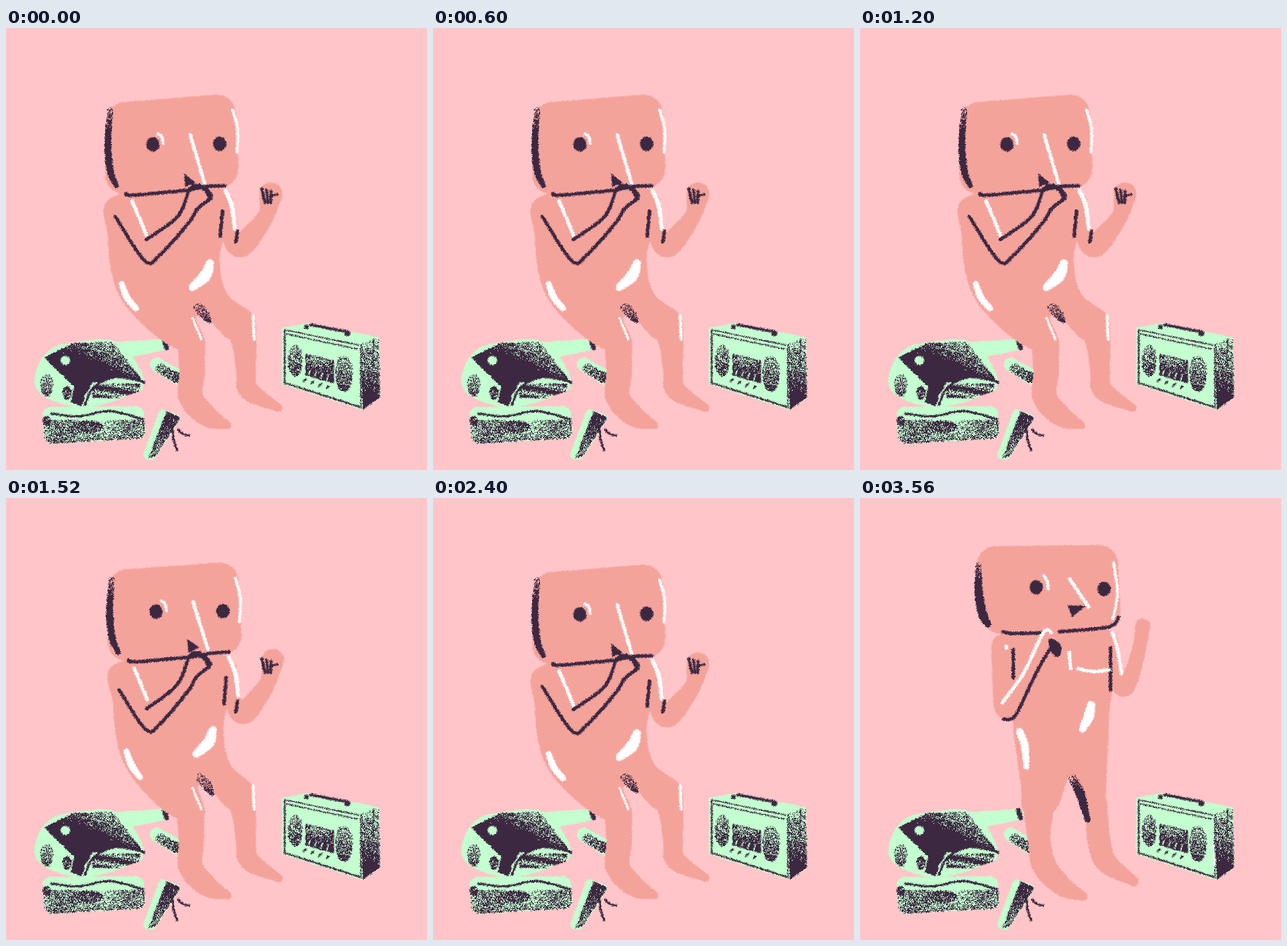
These frames come from a looping animation (731x767 px, 3600 ms). An HTML page with a canvas:

```html
<!DOCTYPE html>
<html lang="en">
<head>
<meta charset="utf-8">
<title>Dancing box head</title>
<style>
html, body { margin: 0; width: 100%; height: 100%; overflow: hidden; background: #ffc5c8; }
canvas { display: block; }
</style>
</head>
<body>
<canvas id="stage" width="731" height="767"></canvas>
<script>
const W = 731, H = 767, STEP = 40, STEPS = 15;
const PINK = '#ffc5c8', SKIN = '#f4a39b', INK = '#3d2841', MINT = '#c3ffcf', WHITE = '#ffffff';
const view = document.getElementById('stage').getContext('2d');

function makeLayer() {
  const layer = document.createElement('canvas');
  layer.width = W;
  layer.height = H;
  return layer.getContext('2d', { willReadFrequently: true });
}

// Stable grain: the same place always gets the same value in 0..1.
function grain(x, y) {
  let h = Math.imul(x, 374761393) + Math.imul(y, 668265263);
  h = Math.imul(h ^ (h >>> 13), 1274126177);
  return ((h ^ (h >>> 16)) >>> 0) / 4294967296;
}

// Catmull-Rom samples through points of any dimension.
function spline(points, closed = false, cuts = 14) {
  const n = points.length, samples = [];
  const at = i => points[closed ? (i + n) % n : Math.max(0, Math.min(n - 1, i))];
  for (let i = 0; i < (closed ? n : n - 1); i++) {
    for (let k = 0; k <= cuts; k++) {
      const t = k / cuts;
      samples.push(at(i).map((b, d) => {
        const a = at(i - 1)[d], c = at(i + 1)[d], e = at(i + 2)[d];
        return b + t / 2 * (c - a + t * (2 * a - 5 * b + 4 * c - e + t * (3 * b - a - 3 * c + e)));
      }));
    }
  }
  return samples;
}

function polygon(points, closed = true) {
  const path = new Path2D();
  for (const [x, y] of points) path.lineTo(x, y);
  if (closed) path.closePath();
  return path;
}

const blob = points => polygon(spline(points, true));

// Tapered limb: joints are [x, y, radius].
function limb(...joints) {
  const path = new Path2D();
  for (const [x, y, r] of spline(joints)) {
    path.moveTo(x + r, y);
    path.arc(x, y, r, 0, 2 * Math.PI);
  }
  return path;
}

function roundQuad(corners, radius) {
  const path = new Path2D(), [a, , , d] = corners;
  path.moveTo((a[0] + d[0]) / 2, (a[1] + d[1]) / 2);
  corners.forEach((c, i) => path.arcTo(...c, ...corners[(i + 1) % 4], radius));
  path.closePath();
  return path;
}

function ellipse(x, y, rx, ry = rx) {
  const path = new Path2D();
  path.ellipse(x, y, rx, ry, 0, 0, 2 * Math.PI);
  return path;
}

function fill(g, path, color) {
  g.fillStyle = color;
  g.fill(path);
}

function line(g, points, color, width) {
  g.strokeStyle = color;
  g.lineWidth = width;
  g.lineCap = g.lineJoin = 'round';
  g.stroke(polygon(spline(points), false));
}

// Spray ink pixels inside a path; density gets box-relative coordinates.
function spray(g, path, [x0, y0, x1, y1], density) {
  g.fillStyle = INK;
  for (let y = Math.floor(y0); y < y1; y++) {
    for (let x = Math.floor(x0); x < x1; x++) {
      const d = density((x - x0) / (x1 - x0), (y - y0) / (y1 - y0));
      if (grain(x, y) < d && g.isPointInPath(path, x + .5, y + .5)) g.fillRect(x, y, 1, 1);
    }
  }
}

function sprayEllipse(g, x, y, rx, ry, density) {
  spray(g, ellipse(x, y, rx, ry), [x - rx, y - ry, x + rx, y + ry], density);
}

function drawBags(g) {
  fill(g, limb([195, 560, 15], [274, 549, 10]), MINT);
  fill(g, blob([[50, 604], [72, 562], [115, 546], [195, 546], [239, 612], [200, 642], [130, 658], [64, 638]]), MINT);
  const flap = polygon([[66, 572], [118, 546], [185, 545], [242, 618], [150, 615], [130, 657], [113, 649], [118, 622]]);
  spray(g, flap, [66, 545, 242, 657], (x, y) => .75 + y * 1.5 - Math.max(0, x - .3) * 1.1);
  sprayEllipse(g, 71, 620, 11, 20, (x, y) => .3 + y * .6);
  sprayEllipse(g, 106, 633, 8, 12, () => .8);
  const pocket = limb([150, 642, 14], [185, 626, 19], [228, 621, 10]);
  fill(g, pocket, MINT);
  spray(g, pocket, [150, 617, 233, 642], (x, y) => .7 + .4 * Math.sin(y * 9 - x * 5));
  line(g, [[137, 654], [152, 624], [190, 606], [239, 614]], INK, 4);
  fill(g, ellipse(103, 577, 8), MINT);
  fill(g, limb([275, 542, 4], [279, 555, 4]), INK);

  const roll = roundQuad([[62, 658], [238, 656], [243, 712], [68, 722]], 14);
  fill(g, roll, MINT);
  spray(g, roll, [66, 680, 242, 722], (x, y) => .32 + .3 * Math.sin(x * 9) * (1 - y) + y * .3);
  sprayEllipse(g, 71, 682, 7, 9, () => .9);
  sprayEllipse(g, 140, 692, 30, 11, () => .8);
  line(g, [[78, 669], [125, 674], [180, 665], [238, 679]], INK, 4);

  fill(g, limb([262, 584, 12], [302, 608, 13]), MINT);
  spray(g, limb([268, 591, 8], [302, 611, 10]), [260, 583, 302, 616], x => .4 + x * .5);

  fill(g, roundQuad([[268, 660], [306, 674], [256, 750], [236, 746]], 6), MINT);
  spray(g, polygon([[279, 665], [303, 676], [260, 743], [247, 746]]), [247, 665, 303, 746], (x, y) => 1 - y * .4);
  line(g, [[289, 695], [291, 714], [297, 733]], INK, 4);
  line(g, [[299, 697], [306, 704], [318, 707]], INK, 4);
}

function drawRadio(g) {
  // Place on the slanted front, u across and v down.
  const front = (u, v) => [484 + 132 * u, 524 + 27 * u + v * (92 + 15 * u)];
  const panel = (u0, v0, u1, v1) => polygon([front(u0, v0), front(u1, v0), front(u1, v1), front(u0, v1)]);

  fill(g, polygon([[479, 520], [525, 512], [648, 537], [649, 641], [620, 663], [479, 618]]), MINT);
  spray(g, polygon([[616, 548], [648, 537], [649, 641], [619, 663]]), [616, 537, 649, 663],
    (x, y) => .3 + y - x * .15);
  line(g, [[638, 542], [638, 590]], INK, 2);
  line(g, [front(0, 0), front(0, 1)], INK, 3);
  line(g, [front(0, 1), front(1, 1)], INK, 3);
  line(g, [front(1, 0), front(1, 1)], INK, 2);
  line(g, [front(0, 0), front(.97, 0)], INK, 2);
  line(g, [front(.03, .07), front(.95, .07)], INK, 2);
  line(g, [[529, 515], [592, 527]], INK, 5);
  fill(g, ellipse(522, 519, 4), INK);
  fill(g, ellipse(593, 530, 5), INK);

  for (const [u, rx] of [[.14, 13], [.78, 15]]) {
    sprayEllipse(g, ...front(u, .52), rx, rx * 2.15, (x, y) => .3 + y * .65);
  }
  const deck = panel(.28, .36, .64, .73);
  spray(g, deck, [...front(.28, .36), ...front(.64, .73)], (x, y) => .4 + y * .8);
  g.lineWidth = 2;
  g.stroke(deck);
  for (let i = 0; i < 4; i++) {
    line(g, [front(.31 + i * .08, .72), front(.34 + i * .08, .62)], MINT, 2);
    line(g, [front(.25 + i * .1, .86), front(.28 + i * .1, .81)], INK, 3);
  }
}

// Every moving part is given as a crouched and an upright pose.
function drawDancer(g, lift) {
  const upright = lift > .5;
  const pose = (low, high) => low.map((p, i) => p.map((v, d) => v + (high[i][d] - v) * lift));
  const skin = path => fill(g, path, SKIN);
  const stroke = (color, width, low, high) => line(g, pose(low, high), color, width);
  const dab = (color, low, high) => fill(g, limb(...pose(low, high)), color);
  const shade = (low, high, density) => {
    const joints = pose(low, high), [a] = joints, b = joints[joints.length - 1];
    spray(g, limb(...joints), [a[0] - 16, a[1] - a[2], b[0] + 10, b[1] + b[2]], density);
  };

  skin(roundQuad(pose([[175, 131], [397, 113], [405, 275], [172, 291]],
    [[199, 84], [446, 81], [454, 225], [215, 237]]), 33));
  skin(blob(pose(
    [[188, 292], [378, 281], [371, 400], [384, 461], [427, 496], [430, 530], [388, 540], [357, 512], [330, 502],
      [345, 550], [298, 557], [240, 517], [192, 455], [177, 365]],
    [[240, 238], [436, 231], [433, 370], [429, 460], [427, 515], [428, 540], [388, 535], [369, 490], [361, 487],
      [336, 545], [286, 545], [279, 495], [267, 410], [261, 320]])));
  dab(SKIN, [[322, 548, 24], [323, 600, 22], [321, 641, 21], [350, 674, 18], [384, 689, 7]],
    [[310, 548, 25], [311, 592, 20], [320, 638, 21], [352, 674, 17], [387, 691, 8]]);
  dab(SKIN, [[410, 522, 24], [415, 560, 20], [417, 600, 17], [423, 630, 17], [473, 659, 7]],
    [[406, 520, 21], [411, 555, 20], [416, 600, 20], [429, 634, 18], [475, 665, 9]]);
  dab(SKIN, [[385, 300, 10], [386, 350, 13], [405, 378, 20], [430, 355, 18], [452, 324, 14], [460, 288, 20]],
    [[438, 245, 6], [444, 310, 10], [458, 329, 16], [473, 302, 14], [485, 260, 12], [491, 222, 13]]);
  dab(SKIN, [[198, 311, 21], [212, 350, 18], [243, 387, 17], [290, 352, 20], [339, 291, 15]],
    [[249, 258, 21], [249, 320, 19], [253, 367, 17], [280, 330, 14], [322, 246, 10]]);

  shade([[181, 143, 5], [177, 200, 6], [181, 248, 6], [192, 274, 4]],
    [[206, 117, 5], [206, 160, 7], [212, 198, 8], [222, 219, 6]], (x, y) => .45 + y * 1.9);
  shade([[334, 485, 8], [345, 497, 8], [354, 509, 3]],
    [[368, 484, 7], [383, 515, 8], [395, 558, 5]], (x, y) => .2 + y * (upright ? 2.5 : .8));

  const eyes = pose([[255, 202], [371, 201]], [[306, 155], [424, 158]]);
  for (const [x, y] of eyes) fill(g, ellipse(x, y, 11.5, 12.5), INK);
  stroke(WHITE, 5, [[264, 184], [270, 188], [273, 200]], [[319, 134], [325, 145], [327, 158]]);
  stroke(WHITE, 6, [[320, 185], [345, 271]], [[364, 141], [397, 189]]);
  stroke(WHITE, 5, [[393, 142], [402, 175], [401, 215]], [[440, 112], [447, 165], [439, 210]]);
  fill(g, polygon(pose([[309, 252], [329, 268], [311, 276]], [[361, 186], [392, 187], [368, 207]])), INK);
  stroke(INK, 6, [[208, 287], [222, 290], [320, 281]], [[248, 232], [265, 235], [316, 234]]);
  stroke(INK, 6, [[320, 281], [348, 275], [380, 274]], [[346, 232], [430, 224], [449, 208]]);

  stroke(INK, 6, [[376, 318], [372, 361]], [[435, 260], [435, 333]]);
  dab(WHITE, [[381, 282, 3], [392, 308, 4], [397, 348, 3]], [[438, 234, 3], [447, 262, 3], [454, 305, 3]]);
  stroke(WHITE, 6, [[219, 300], [244, 360]], [[254, 258], [254, 260]]);
  dab(WHITE, [[354, 408, 7], [346, 430, 10], [324, 449, 7]], [[401, 359, 7], [397, 380, 9], [386, 401, 6]]);
  dab(WHITE, [[201, 444, 5], [210, 468, 6], [226, 487, 5]], [[277, 405, 6], [286, 430, 7], [289, 466, 5]]);
  stroke(upright ? WHITE : INK, 6, [[244, 367], [298, 327], [319, 280], [337, 273]],
    [[247, 355], [284, 304], [318, 234], [332, 233]]);
  stroke(INK, 6, [[190, 327], [241, 404], [268, 393], [318, 337], [333, 313], [356, 296]],
    [[250, 384], [260, 384], [272, 374], [298, 320], [312, 292], [330, 262]]);
  dab(INK, [[324, 272, 3], [345, 279, 4], [354, 291, 5]], [[331, 248, 4], [339, 259, 10], [342, 269, 7]]);

  if (upright) {
    line(g, [[266, 263], [266, 312]], INK, 6);
    line(g, [[363, 268], [366, 296]], WHITE, 6);
    line(g, [[378, 296], [405, 301], [433, 298]], WHITE, 6);
    line(g, [[614, 602], [616, 638]], WHITE, 3);
  } else {
    line(g, [[402, 352], [399, 371]], INK, 6);
    for (let i = 0; i < 3; i++) line(g, [[444 + i * 8, 279 + i * 2], [450 + i * 5, 303]], INK, 5);
    line(g, [[462, 291], [471, 289]], INK, 4);
    line(g, [[324, 503], [339, 540]], WHITE, 4);
    line(g, [[429, 499], [431, 540]], WHITE, 5);
  }
}

// Drop on the beat, sink a little further, then swing back up.
function liftAt(step) {
  const s = step / (STEPS - 1);
  return s ** 4 - .32 * Math.sin(2 * Math.PI * Math.min(s, .5));
}

// Fray every edge by moving each pixel up to one step sideways.
const fray = new Int32Array(W * H);
for (let y = 1; y < H - 1; y++) {
  for (let x = 1; x < W - 1; x++) {
    const dx = Math.floor(grain(x + 2000, y) * 3) - 1;
    const dy = Math.floor(grain(x, y + 2000) * 3) - 1;
    fray[y * W + x] = dy * W + dx;
  }
}

const props = makeLayer();
props.fillStyle = PINK;
props.fillRect(0, 0, W, H);
drawBags(props);
drawRadio(props);

const scene = makeLayer();
const drawings = Array.from({ length: STEPS }, (_, step) => {
  scene.drawImage(props.canvas, 0, 0);
  drawDancer(scene, liftAt(step));
  const clean = new Uint32Array(scene.getImageData(0, 0, W, H).data.buffer);
  const image = new ImageData(W, H);
  const rough = new Uint32Array(image.data.buffer);
  for (let i = 0; i < rough.length; i++) rough[i] = clean[i + fray[i]];
  return image;
});

const start = performance.now();
function frame() {
  const step = Math.floor((performance.now() - start) / STEP) % STEPS;
  view.putImageData(drawings[step], 0, 0);
  requestAnimationFrame(frame);
}
frame();
</script>
</body>
</html>
```
